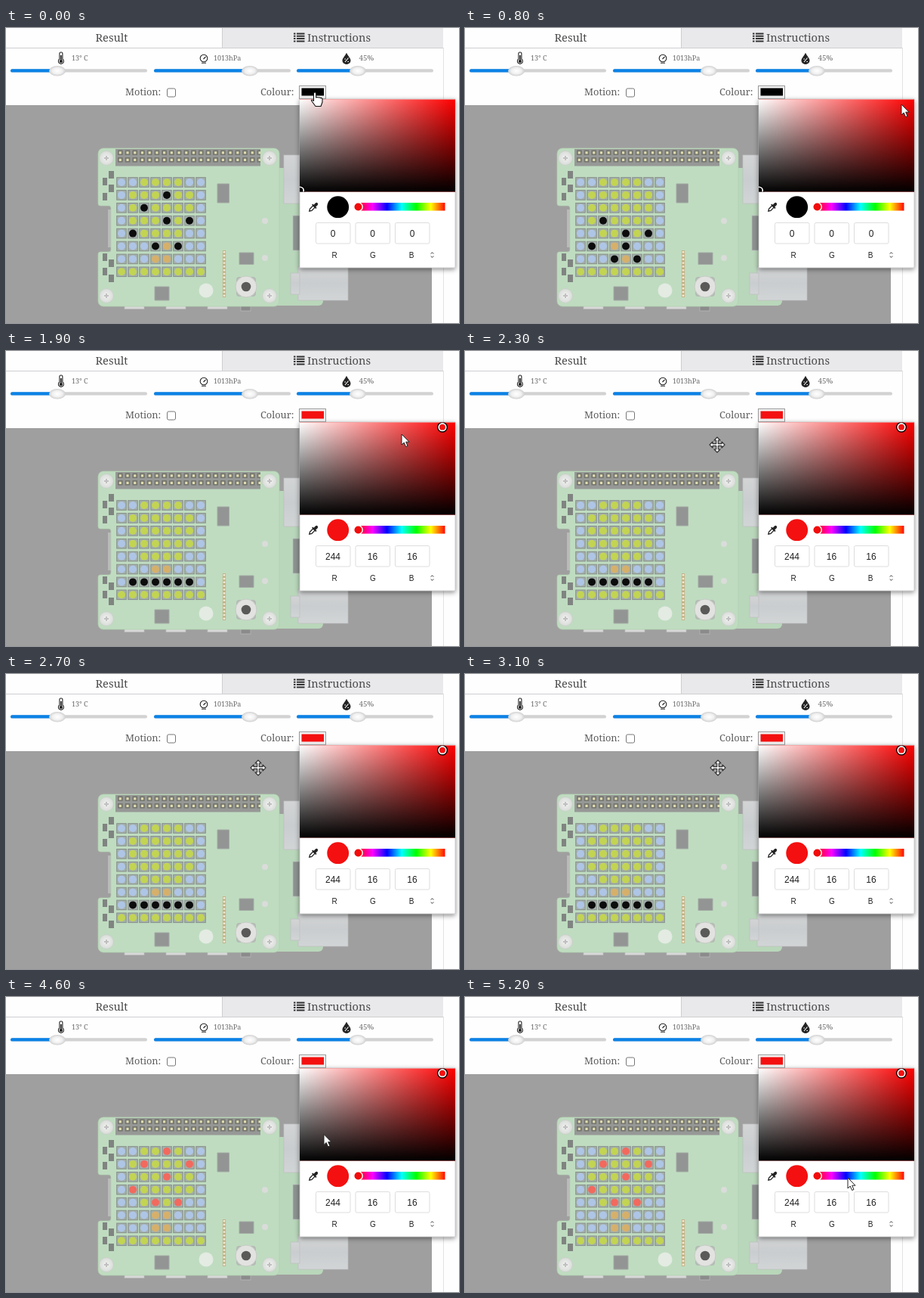
Animation of 600 by 390 pixels, one loop 5.3 s. Source, as an HTML page:

```html
<!DOCTYPE html>
<html lang="en">
<head>
<meta charset="utf-8">
<title>Board simulator</title>
<style>
  html, body { margin: 0; width: 100%; height: 100%; overflow: hidden; background: #fff; }
  svg { display: block; width: 100vw; height: 100vh; }
  .serif { font-family: "Noto Serif", serif; fill: #5c5c5c; }
  .tab { font-size: 14.6px; fill: #4a4a4a; }
  .label { font-size: 12.8px; }
  .reading { font-size: 9px; fill: #6a6a6a; }
  .sans { font: 12px "Liberation Sans", Arial, sans-serif; fill: #222; text-anchor: middle; }
  .small { font-size: 10px; }
</style>
</head>
<body>
<svg viewBox="0 0 600 390">
  <defs>
    <linearGradient id="white"><stop stop-color="#fff"/><stop offset="1" stop-color="#fff" stop-opacity="0"/></linearGradient>
    <linearGradient id="black" x2="0" y2="1"><stop stop-color="#000" stop-opacity="0"/><stop offset="1"/></linearGradient>
    <linearGradient id="hue" gradientUnits="userSpaceOnUse" x1="466" x2="582">
      <stop stop-color="#f00"/><stop offset=".167" stop-color="#f0f"/><stop offset=".333" stop-color="#00f"/>
      <stop offset=".5" stop-color="#0ff"/><stop offset=".667" stop-color="#0f0"/><stop offset=".833" stop-color="#ff0"/>
      <stop offset="1" stop-color="#f00"/>
    </linearGradient>
    <linearGradient id="metal" x2="0" y2="1"><stop stop-color="#d2d4d5"/><stop offset=".5" stop-color="#cacdcf"/><stop offset="1" stop-color="#d2d5d6"/></linearGradient>
    <radialGradient id="thumb"><stop stop-color="#fff"/><stop offset=".6" stop-color="#f0f0f0"/><stop offset="1" stop-color="#cecece"/></radialGradient>
    <radialGradient id="screwFill"><stop stop-color="#f2f2f2"/><stop offset="1" stop-color="#d8dcd8"/></radialGradient>
    <filter id="shadow" x="-10%" y="-10%" width="120%" height="120%"><feDropShadow dx="0" dy="2" stdDeviation="3" flood-opacity=".45"/></filter>
    <clipPath id="field"><rect x="389" y="94.5" width="206" height="122"/></clipPath>
    <g id="screw">
      <circle r="9.5" fill="url(#screwFill)" stroke="#c9d2c9"/>
      <path d="M-3 0H3M0-3V3" stroke="#c0c0c0" stroke-width="2"/>
    </g>
  </defs>

  <!-- tabs -->
  <rect width="600" height="390" fill="#fefefe"/>
  <rect x="286" width="293" height="26" fill="#e9e9ec"/>
  <path d="M0 26.5H579M286.5 0V26" stroke="#cfcfd2"/>
  <text class="serif tab" x="118.5" y="17.7">Result</text>
  <text class="serif tab" x="399" y="17.7">Instructions</text>
  <path d="M381 7.5H383.5M385 7.5H395.5M381 10.8H383.5M385 10.8H395.5M381 14.1H383.5M385 14.1H395.5M381 17.4H383.5M385 17.4H395.5" stroke="#333" stroke-width="2"/>

  <!-- readings -->
  <g fill="none" stroke="#222" stroke-width="1.1">
    <path d="M70.9 41V34a2 2 0 0 1 4 0V41a3.5 3.5 0 1 1-4 0Z"/>
    <path d="M72.9 36V44" stroke-width="1.6"/><circle cx="72.9" cy="44" r="1.5" fill="#222"/>
    <circle cx="262" cy="40" r="4.8"/><path d="M261.5 41L264.500 38M259 46.3H265"/>
    <path d="M451 34C453 38 456 40 456 43A5 4.5 0 0 1 446 43C446 40 449 38 451 34Z" fill="#222"/>
    <path d="M449 45L453.5 39.5M448.4 41H450M452.4 44.5H454" stroke="#fff"/>
  </g>
  <text class="serif reading" x="87" y="43">13° C</text>
  <text class="serif reading" x="275" y="43">1013hPa</text>
  <text class="serif reading" x="467.500" y="43" style="font-size:9.8px">45%</text>
  <g id="sliders"></g>

  <text class="serif label" x="158" y="89">Motion:</text>
  <rect x="213.5" y="80" width="11" height="11" rx="2" fill="#fff" stroke="#777"/>
  <text class="serif label" x="337" y="89">Colour:</text>
  <rect x="388.5" y="76.5" width="35" height="17" fill="#f4f4f4" stroke="#999"/>
  <rect class="pick" x="391.500" y="79.500" width="29.500" height="10"/>

  <!-- board -->
  <rect y="102" width="564" height="288" fill="#a09f9f"/>
  <path d="M579.5 26V390" stroke="#e2e2e2"/>
  <g fill="#d8d8d8" stroke="#bbb" stroke-width=".7">
    <rect x="157" y="365" width="26" height="6.500"/><rect x="212" y="365" width="26" height="6.500"/>
    <rect x="267" y="365" width="26" height="6.500"/><rect x="311" y="365" width="13" height="9" fill="#8b8b8b"/>
  </g>
  <path d="M340 185H420V361a6 6 0 0 1-6 6H340Z" fill="#b9d7ba"/>
  <g fill="url(#metal)" stroke="#bcbebf" stroke-width=".7">
    <rect x="368" y="168" width="70" height="64"/>
    <rect x="380" y="248" width="60" height="46" fill="#8d9390"/>
    <rect x="387" y="315" width="66" height="45"/><rect x="377" y="324" width="12" height="28"/>
  </g>
  <rect x="135" y="240" width="5" height="50" fill="#b9bbb9"/>
  <path d="M129 159H355a7 7 0 0 1 7 7V361a7 7 0 0 1-7 7H129a7 7 0 0 1-7-7V299a3 3 0 0 1 3-3H136a3 3 0 0 0 3-3V238a3 3 0 0 0-3-3H125a3 3 0 0 1-3-3V166a7 7 0 0 1 7-7Z" fill="#bfdcc0" stroke="#b0ceb1" stroke-width=".7"/>
  <rect x="145" y="160" width="192" height="22.5" fill="#969896"/>
  <path d="M148 164.800H337M148 174.300H337" stroke="#73746c" stroke-width="6.600" stroke-dasharray="6.600 3.120"/>
  <path d="M149.7 164.800H337M149.7 174.300H337" stroke="#e0dcb0" stroke-width="3.200" stroke-dasharray="3.200 6.520"/>
  <use href="#screw" x="133" y="172"/><use href="#screw" x="349" y="172"/>
  <use href="#screw" x="133" y="354"/><use href="#screw" x="349" y="354"/>
  <path d="M136 189h7v10h-7zM128 198h6v10h-6zM136 207h7v10h-7zM128 218h6v10h-6zM128 298h6v10h-6zM136 306h7v10h-7zM128 317h6v10h-6zM136 326h7v10h-7z" fill="#808481"/>
  <path d="M280 206h15.5v25h-15.5zM309 297h19v15.5h-19zM197 342h19v18h-19z" fill="#929594" stroke="#a3aaa4"/>
  <circle cx="343" cy="255" r="4" fill="#d9dcd9"/><circle cx="343" cy="304" r="4" fill="#d9dcd9"/>
  <path d="M289 294V356" stroke="#c3b085" stroke-width="4.2"/>
  <path d="M289 295V356" stroke="#f2ead4" stroke-width="2.6" stroke-dasharray="2.4 2.4"/>
  <rect x="305" y="329" width="26" height="26" rx="4" fill="#b4bbb4"/>
  <circle cx="318" cy="342" r="14" fill="#e2e2e0" stroke="#c5cac5"/>
  <circle cx="318" cy="342" r="6.3" fill="#5a5a58"/>
  <circle cx="265" cy="347" r="9.5" fill="#e3ebe2"/>
  <g id="leds"></g>

  <!-- colour picker -->
  <rect x="389" y="94" width="206" height="223" fill="#fff" stroke="#aaa" stroke-width=".6" filter="url(#shadow)"/>
  <g clip-path="url(#field)">
    <rect x="389" y="94" width="206" height="123" fill="#f00"/>
    <rect x="389" y="94" width="206" height="123" fill="url(#white)"/>
    <rect x="389" y="94" width="206" height="123" fill="url(#black)"/>
    <g id="marker"><circle r="7" fill="#000"/><circle r="5.600" fill="#fff"/><circle class="pick" r="3.900"/></g>
  </g>
  <g transform="translate(407 237) rotate(45) scale(.92)" fill="none" stroke="#222" stroke-width="1.4">
    <path d="M-1.8-2V5L0 8L1.8 5V-2"/><path d="M-4-2H4" stroke-width="2"/><path d="M0-3V-6.5" stroke-width="4.2" stroke-linecap="round"/>
  </g>
  <circle class="pick" cx="439.700" cy="236.700" r="14.400"/>
  <rect x="463" y="231" width="118.5" height="10.5" fill="url(#hue)"/>
  <circle cx="466.500" cy="236.500" r="6.5" fill="#fff"/><circle cx="466.500" cy="236.500" r="5" fill="#f20c0c"/>
  <g id="fields"></g>
  <path d="M562.700 298.500L564.500 296.700L566.300 298.500M562.700 301.500L564.500 303.300L566.300 301.500" fill="none" stroke="#333"/>

  <!-- pointers -->
  <g id="cursor" stroke-linejoin="round">
    <path data-kind="arrow" d="M0 0V14L3.2 11L5.6 16.500L8 15.500L5.700 10.200H10Z" fill="#fff" stroke="#222"/>
    <path data-kind="hand" d="M-1.500 1.500a1.600 1.600 0 0 1 3.200 0V7q1.500-1 2.800 0 1.500-.8 2.800.5 2-.6 2.700 1V13l-2 5.500H1L-4.500 11q0-2 3 .3Z" fill="#fff" stroke="#111" stroke-width="1.100"/>
    <path data-kind="move" d="M0-10L4-6H1.300V-1.300H6V-4L10 0L6 4V1.300H1.300V6H4L0 10L-4 6H-1.300V1.300H-6V4L-10 0L-6-4V-1.300H-1.300V-6H-4Z" fill="#fff" stroke="#333" stroke-width="1.200"/>
  </g>
</svg>
<script>
const LOOP = 5300, STEP = 100;
const PICK_AT = 1100, RESET_AT = 3500;
const $ = id => document.getElementById(id);

function add(parent, tag, attrs, text) {
  const el = document.createElementNS('http://www.w3.org/2000/svg', tag);
  for (const key in attrs) el.setAttribute(key, attrs[key]);
  if (text !== undefined) el.textContent = text;
  return parent.appendChild(el);
}

for (const [x, thumb] of [[6, 68], [196, 323], [385, 466]]) {
  const bar = (width, fill) => add($('sliders'), 'rect', { x, y: 54.2, width, height: 4.4, rx: 2.2, fill });
  bar(181, '#d2d2d2');
  bar(thumb - x, '#0b82e6');
  add($('sliders'), 'ellipse', { cx: thumb, cy: 56.7, rx: 11, ry: 6.8, fill: 'url(#thumb)' });
}

const values = ['R', 'G', 'B'].map((name, i) => {
  const x = 410.5 + i * 52.5;
  add($('fields'), 'rect', { x, y: 257.5, width: 45.5, height: 27.5, rx: 2, fill: '#fff', stroke: '#ddd' });
  add($('fields'), 'text', { x: 435 + i * 51, y: 304, class: 'sans small' }, name);
  return add($('fields'), 'text', { x: x + 22.5, y: 275.5, class: 'sans' });
});

// b = sky, y = leaves and grass, o = trunk
const TREE = ['bbyyyybb', 'byyyyyyb', 'byyyyyyb', 'byyyyyyb', 'bbyyyybb', 'bbboobbb', 'bbboobbb', 'yyyyyyyy'];
const LIGHT = { b: '#aec5e6', y: '#c2d452', o: '#d6b06a', black: '#0c0c0c', red: '#f2695e' };
const leds = TREE.map((row, r) => [...row].map((_, c) => {
  const x = 153 + c * 15, y = 204 + r * 16.9;
  add($('leds'), 'rect', { x: x - 6.3, y: y - 6.3, width: 12.6, height: 12.6, fill: '#a5b0ac', stroke: '#868f8b', 'stroke-width': 1 });
  return add($('leds'), 'circle', { cx: x, cy: y, r: 5 });
}));

// column, resting row, row at 0 ms, row at 800 ms
const APPLES = [[4, 0, 1, 4], [2, 1, 2, 3], [6, 1, 3, 4], [4, 2, 3, 5], [1, 3, 4, 5], [3, 4, 5, 6], [5, 4, 5, 6]];

function appleRow([, rest, from, to], t) {
  if (t >= RESET_AT) return rest;
  if (t < 800) return Math.round(from + (to - from) * t / 800);
  return Math.min(6, to + Math.floor((t - 800) / 300));
}

const PATH = [[0, 409, 85], [100, 409, 85], [700, 578, 101], [1500, 578, 101], [1900, 524, 110],
  [2300, 334, 124], [3000, 334, 124], [3100, 335, 124], [4100, 335, 124], [5100, 507, 239], [LOOP, 507, 239]];

function pointerAt(t) {
  const i = PATH.findIndex(p => p[0] > t);
  const [t0, x0, y0] = PATH[i - 1], [t1, x1, y1] = PATH[i];
  const k = (t - t0) / (t1 - t0), e = k * k * (3 - 2 * k);
  return [x0 + (x1 - x0) * e, y0 + (y1 - y0) * e];
}

const kinds = [...document.querySelectorAll('[data-kind]')];
const swatches = document.querySelectorAll('.pick');

function draw(t) {
  const picked = t >= PICK_AT;
  const rgb = picked ? [244, 16, 16] : [0, 0, 0];
  swatches.forEach(el => el.setAttribute('fill', `rgb(${rgb})`));
  values.forEach((el, i) => el.textContent = rgb[i]);
  $('marker').setAttribute('transform', picked ? 'translate(578 100.7)' : 'translate(389.5 215)');

  leds.forEach((row, r) => row.forEach((led, c) => led.setAttribute('fill', LIGHT[TREE[r][c]])));
  const apple = t >= RESET_AT ? LIGHT.red : LIGHT.black;
  for (const a of APPLES) leds[appleRow(a, t)][a[0]].setAttribute('fill', apple);

  const [x, y] = pointerAt(t);
  const kind = x < 388 ? 'move' : x < 424 && y < 94 ? 'hand' : 'arrow';
  $('cursor').setAttribute('transform', `translate(${x} ${y})`);
  for (const el of kinds) el.style.display = el.dataset.kind === kind ? '' : 'none';
}

const start = performance.now();
function tick() {
  const t = (performance.now() - start) % LOOP;
  draw(Math.floor(t / STEP) * STEP);
  requestAnimationFrame(tick);
}
tick();
</script>
</body>
</html>
```
